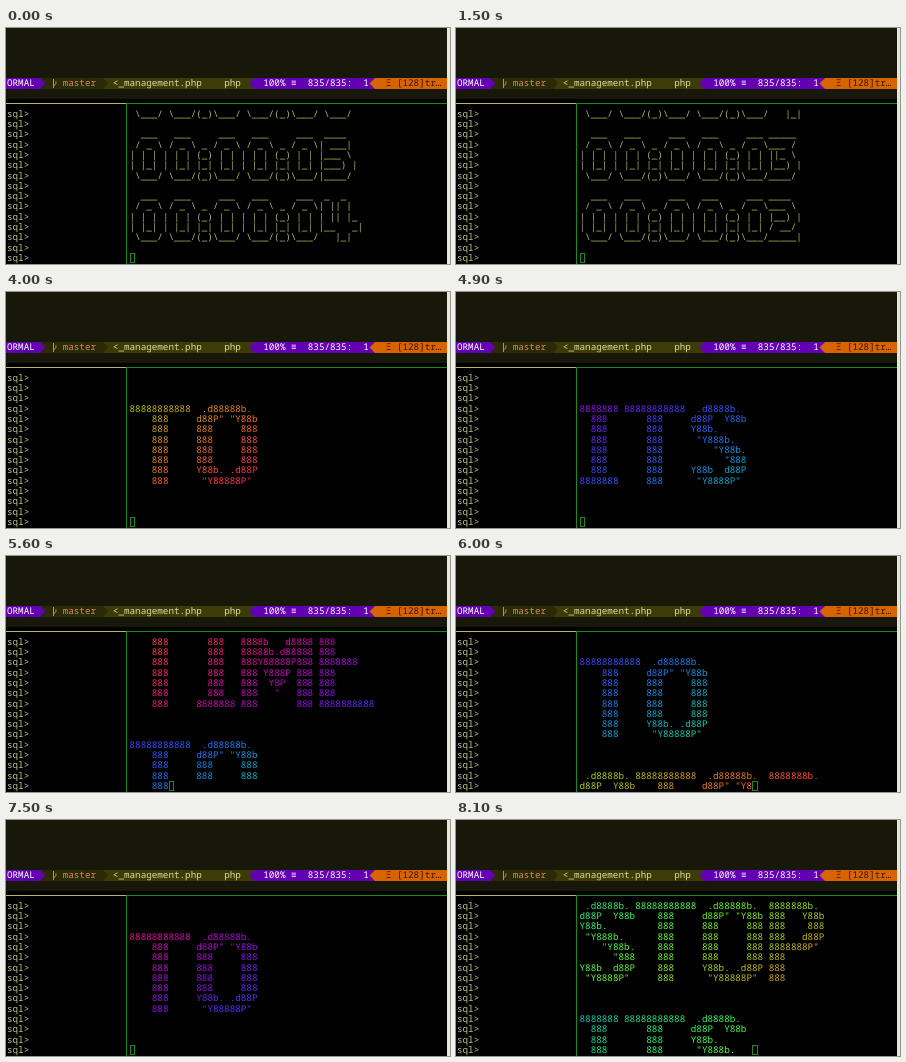
Animation, 444 px wide and 236 px high, one loop 8200 ms. Source, as an HTML page:

```html
<!DOCTYPE html>
<html lang="en">
<head>
<meta charset="utf-8">
<title>Terminal countdown</title>
<style>
  html, body { margin: 0; width: 100%; height: 100%; overflow: hidden; background: #000; }
  #stage {
    position: relative; width: 444px; height: 236px; overflow: hidden; background: #000;
    font: 9.283px/10.286px "Noto Sans Mono", "DejaVu Sans Mono", monospace;
    text-rendering: geometricPrecision; font-kerning: none; font-variant-ligatures: none;
  }
  svg { position: absolute; left: 0; top: 0; }
  .row { position: absolute; white-space: pre; height: 10.286px; }
  .sql { color: #c4c487; }
  #cursor {
    position: absolute; box-sizing: border-box; width: 5.6px; height: 10px;
    border: 1px solid #1c8a1c;
  }
</style>
</head>
<body>
<div id="stage">
  <svg width="444" height="236" viewBox="0 0 444 236">
    <rect width="441" height="71" fill="#17170a"/>
    <rect y="50" width="441" height="11" fill="#3c3c08"/>
    <path d="M34 50H97L102 55.5L97 61H34z" fill="#2a2a06"/>
    <path d="M0 50H34L39.5 55.5L34 61H0z" fill="#6400b4"/>
    <path d="M248.500 50H369V61H248.500L243 55.500z" fill="#6400b4"/>
    <path d="M369 50H441V61H369L363.500 55.500z" fill="#d76400"/>
    <path d="M47.500 51V60M47.500 57.500C50 57 50 56 50 53.500" fill="none" stroke="#d7788c"/>
    <path d="M0 75.500H120" stroke="#b4b464"/>
    <path d="M120 75.500H441M120.500 75V236" stroke="#1c8a1c" fill="none"/>
    <rect x="441" width="3" height="236" fill="#e6e6d2"/>
  </svg>
  <div id="cursor"></div>
</div>
<script>
const LOOP = 8200, STEP = 100;
const CELL = 5.57, LINE = 10.286, TOP = 80.900, ROWS = 15, PANE = 22;
const stage = document.getElementById('stage');
const cursor = document.getElementById('cursor');

function addRow(col, y, color, text = '') {
  const el = document.createElement('div');
  el.className = 'row';
  el.style.cssText = `left:${1 + col * CELL}px;top:${y}px;color:${color}`;
  el.textContent = text;
  stage.appendChild(el);
  return el;
}

// Status bar: column, colour, text
[
  [0, '#fff', 'ORMAL'], [10, '#d7875f', 'master'],
  [19, '#dcdca0', '<_management.php'], [39, '#dcdca0', 'php'],
  [46, '#fff', '100%'], [51, '#fff', '≡'], [54, '#fff', '835/835:  1'],
  [68, '#3a1400', 'Ξ'], [70, '#3a1400', '[128]tr…']
].forEach(([col, color, text]) => addRow(col, 50, color, text));

const lines = [];
for (let r = 0; r < ROWS; r++) {
  addRow(0, TOP + r * LINE, '#c4c487', 'sql>');
  lines.push(addRow(PANE, TOP + r * LINE, '#b9b95f'));
}

// Small digits for the countdown
const DIGITS = {
  0: ['  ___  ', ' / _ \\ ', '| | | |', '| |_| |', ' \\___/ '],
  1: [' _ ', '/ |', '| |', '| |', '|_|'],
  2: [' ____  ', '|___ \\ ', '  __) |', ' / __/ ', '|_____|'],
  3: [' _____ ', '|___ / ', '  |_ \\ ', ' ___) |', '|____/ '],
  4: [' _  _   ', '| || |  ', '| || |_ ', '|__   _|', '   |_|  '],
  5: [' ____  ', '| ___| ', '|___ \\ ', ' ___) |', '|____/ '],
  6: ['  __   ', ' / /_  ', "| '_ \\ ", '| (_) |', ' \\___/ '],
  ':': ['   ', ' _ ', '(_)', ' _ ', '(_)']
};
const RANK = " _|/\\()";

// Neighbouring glyphs share a column; the higher ranked character wins
function clock(n) {
  const last = n === 2 || n === 3 ? 33 : 34;
  const starts = [0, 6, 12, 14, 20, 26, 28, last];
  const rows = Array.from({ length: 5 }, () => Array(42).fill(' '));
  [...('00:00:0' + n)].forEach((ch, i) => DIGITS[ch].forEach((text, r) =>
    [...text].forEach((c, k) => {
      const x = starts[i] + k;
      if (RANK.indexOf(c) >= RANK.indexOf(rows[r][x])) rows[r][x] = c;
    })));
  return [...rows.map(row => row.join('').trimEnd()), ''];
}

// Big letters
const stem = (pad, cap, foot) =>
  [cap, ...Array(6).fill(' '.repeat(pad) + '888'), foot || ' '.repeat(pad) + '888'];
const LETTERS = {
  I: stem(2, '8888888', '8888888'),
  T: stem(4, '88888888888'),
  S: [' .d8888b.', 'd88P  Y88b', 'Y88b.', ' "Y888b.', '    "Y88b.', '      "888',
      'Y88b  d88P', ' "Y8888P"'],
  O: [' .d88888b.', 'd88P" "Y88b', ...Array(4).fill('888     888'),
      'Y88b. .d88P', ' "Y88888P"'],
  M: ['888b     d888', '8888b   d8888', '88888b.d88888', '888Y88888P888',
      '888 Y888P 888', '888  Y8P  888', '888   "   888', '888       888'],
  E: ['8888888888', '888', '888', '8888888', '888', '888', '888', '8888888888'],
  P: ['8888888b.', '888   Y88b', '888    888', '888   d88P', '8888888P"',
      '888', '888', '888']
};

function banner(word, cols, width) {
  return LETTERS.I.map((_, r) => {
    let row = '';
    [...word].forEach((ch, i) => { row = row.padEnd(cols[i]) + LETTERS[ch][r]; });
    return row.padEnd(width);
  }).concat('', '', '');
}
const WORDS = [
  banner('ITS', [0, 8, 20], 31),
  banner('TIME', [0, 12, 20, 34], 45),
  banner('TO', [0, 12], 24),
  banner('STOP', [0, 10, 22, 34], 45)
];
const HUES = [1.75, 2.5, 0.4, 5, 3, 1.3, 3.6, 0.2, 0.75, 4.2, 2.2, -1.1, 4.75];
const RATE = 2; // characters per ms
const wordStart = n => n ? 3056.25 + 415 * n : 3089.25;

function rainbow(a) {
  const part = k => Math.round(128 + 127 * Math.sin(a + k * Math.PI * 2 / 3));
  return `rgb(${part(0)},${part(1)},${part(2)})`;
}

// Every line printed up to time t; the last one holds the cursor
function output(t) {
  const out = [];
  const add = (text, hue) => out.push({ text, hue });
  const lowest = Math.max(0, 4 - Math.floor((t + 920) / 1000));
  for (let n = 6; n >= lowest; n--) clock(n).forEach(text => add(text));

  for (let n = 0; n < HUES.length && t >= wordStart(n); n++) {
    let left = Math.floor((t - wordStart(n)) * RATE);
    const rows = WORDS[n % 4];
    for (let r = 0; r < rows.length; r++) {
      const hue = HUES[n] + r * 0.1;
      if (left <= rows[r].length) {
        add(rows[r].slice(0, left), hue);
        return out;
      }
      add(rows[r], hue);
      left -= rows[r].length + 1;
    }
  }
  add('');
  return out;
}

function paint(el, line) {
  el.textContent = '';
  if (!line) return;
  if (line.hue === undefined) {
    el.textContent = line.text;
    return;
  }
  [...line.text].forEach((c, x) => {
    const span = document.createElement('span');
    span.textContent = c;
    span.style.color = rainbow(line.hue + x / 30);
    el.appendChild(span);
  });
}

let shown = -1;
function frame() {
  const t = Math.floor(performance.now() % LOOP / STEP) * STEP;
  if (t !== shown) {
    shown = t;
    const view = output(t).slice(-ROWS);
    lines.forEach((el, r) => paint(el, view[r]));
    const col = PANE + view[view.length - 1].text.length;
    cursor.style.left = 1 + col * CELL + 'px';
    cursor.style.top = TOP + (view.length - 1) * LINE + 'px';
  }
  requestAnimationFrame(frame);
}
frame();
</script>
</body>
</html>
```
